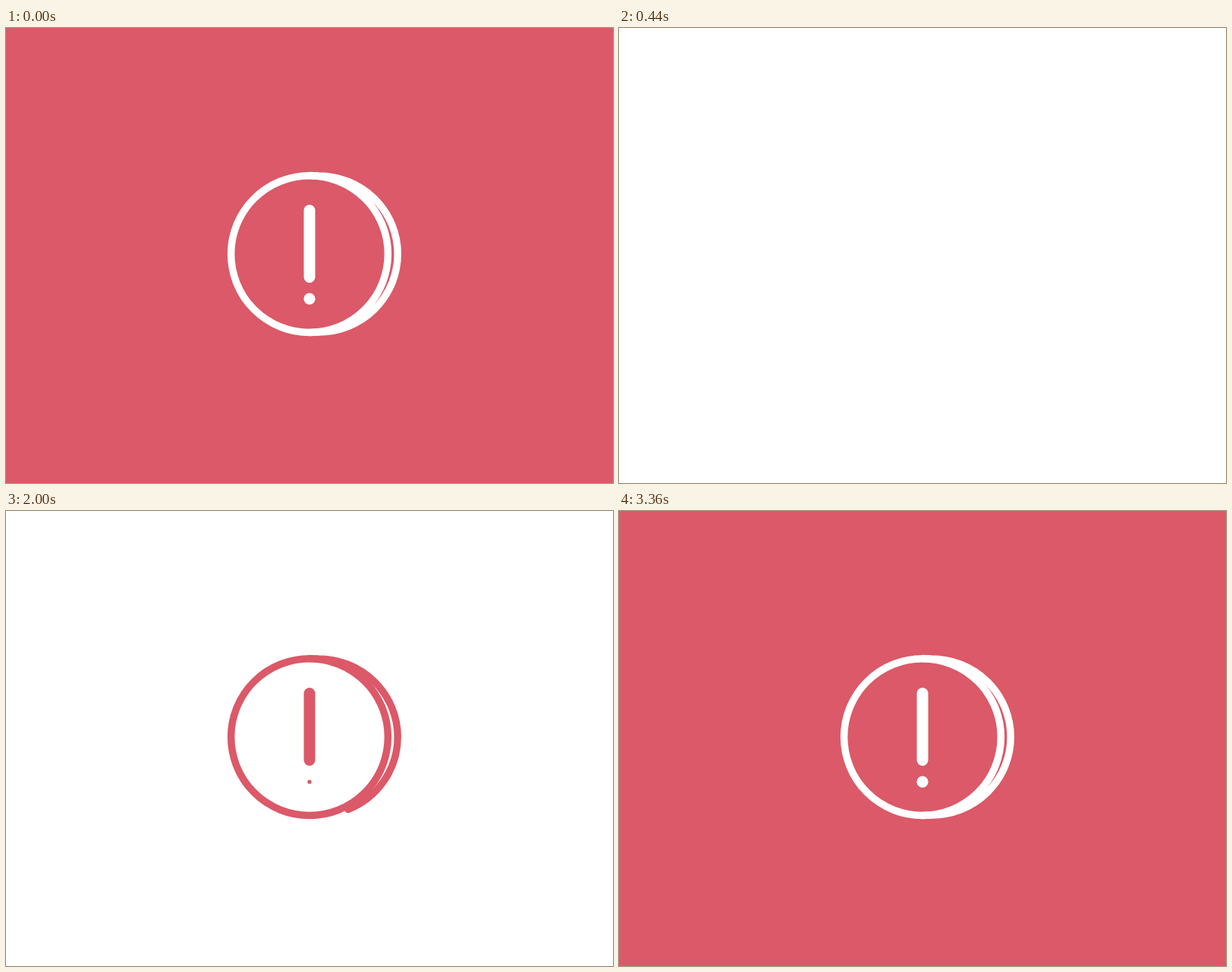
An HTML page that plays this animation: 800x600 px, repeating every 3.92 s.

```html
<!DOCTYPE html>
<html lang="en">
<head>
<meta charset="utf-8">
<title>Alert icon</title>
<style>
  html, body { margin: 0; width: 100%; height: 100%; overflow: hidden; }
  svg { display: block; width: 100vw; height: 100vh; }
  path { fill: none; stroke-width: 9.5; stroke-linecap: round; }
</style>
</head>
<body>
<svg viewBox="0 0 800 600">
  <path id="ring" pathLength="1" d="M400 194.7A103.4 103.4 0 0 1 400 401.5A103.4 103.4 0 0 1 400 194.7"/>
  <path id="swoosh" pathLength="1" d="M400 194.6L412 195A104.2 103 0 0 1 412 401L400 401.5"/>
  <path id="bar" pathLength="1" style="stroke-width:15" d="M400 240.5V328.5"/>
  <circle id="dot" cx="400" cy="357.2"/>
</svg>
<script>
const LOOP = 3920, STEP = 40;
const RED = [219, 89, 104], WHITE = [255, 255, 255];
const svg = document.querySelector('svg');
const [ring, swoosh, bar, dot] = ['ring', 'swoosh', 'bar', 'dot'].map(id => document.getElementById(id));

const progress = (t, from, to) => Math.min(1, Math.max(0, (t - from) / (to - from)));
const cubic = p => p < .5 ? 4 * p ** 3 : 1 - 4 * (1 - p) ** 3;
const sine = p => (1 - Math.cos(Math.PI * p)) / 2;
const mix = (a, b, p) => `rgb(${a.map((v, i) => Math.round(v + (b[i] - v) * p))})`;

function trim(path, p) {
  path.style.visibility = p > 0 ? 'visible' : 'hidden';
  path.style.strokeDasharray = p < 1 ? `${p} 2` : 'none';
}

function draw(t) {
  const intro = t < 480;
  const toRed = progress(t, 2840, 3040);
  const ink = intro ? mix(WHITE, WHITE, 0) : mix(RED, WHITE, toRed);

  svg.style.background = intro ? mix(RED, WHITE, progress(t, 200, 440)) : mix(WHITE, RED, toRed);
  svg.style.stroke = ink;
  dot.style.fill = ink;
  dot.style.stroke = 'none';

  trim(ring, intro ? 1 : cubic(progress(t, 480, 1240)));
  trim(swoosh, intro ? 1 : cubic(progress(t, 1320, 2340)));
  trim(bar, intro ? 1 : cubic(progress(t, 1240, 1960)));
  dot.setAttribute('r', 7.6 * (intro ? 1 : sine(progress(t, 1920, 2120))));
}

const start = performance.now();
function tick() {
  const t = (performance.now() - start) % LOOP;
  draw(Math.floor(t / STEP) * STEP);
  requestAnimationFrame(tick);
}
tick();
</script>
</body>
</html>
```
